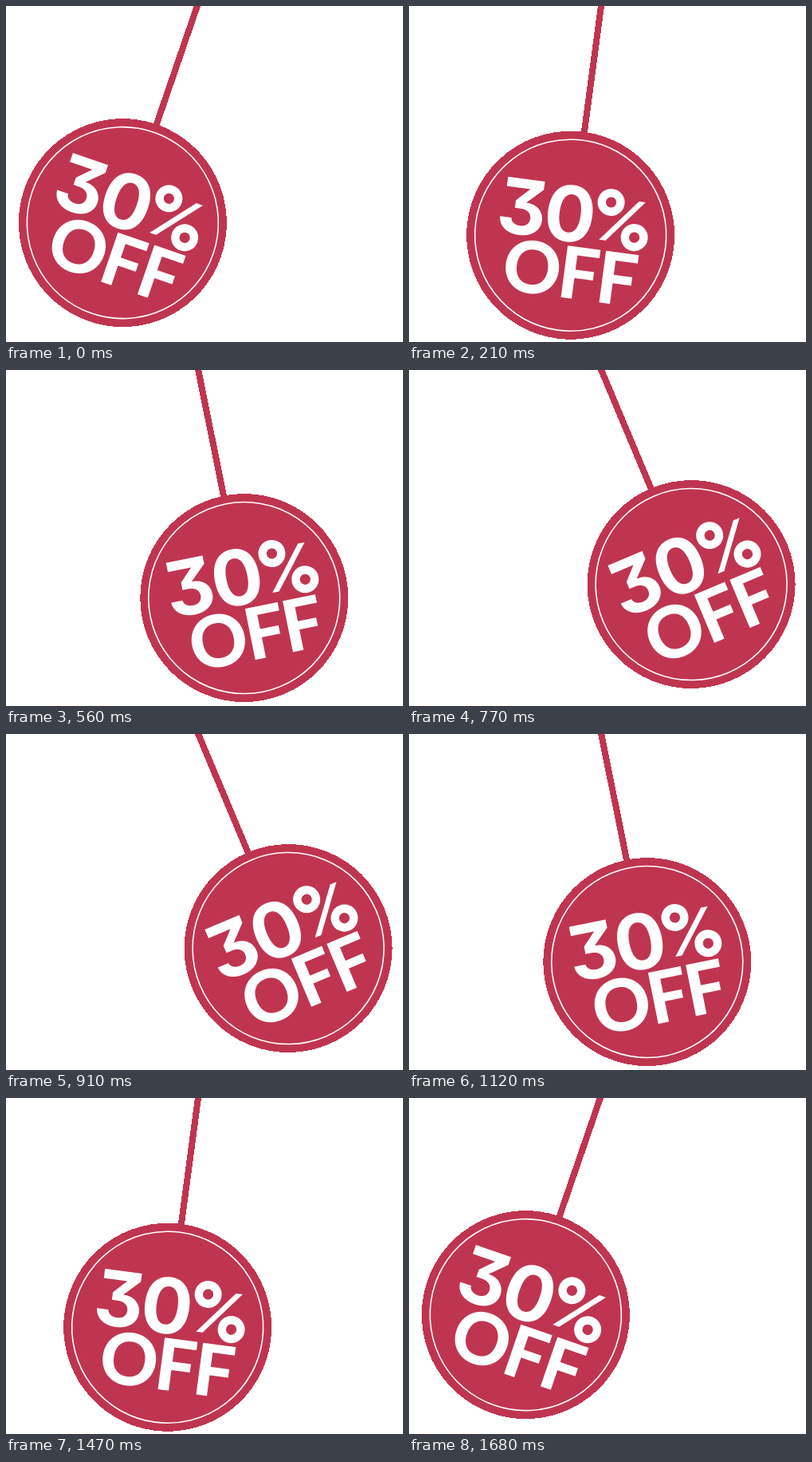
Animation, 498 px wide and 421 px high, one loop 1750 ms. Source, as an HTML page:

```html
<!DOCTYPE html>
<html lang="en">
<head>
<meta charset="utf-8">
<title>30% OFF</title>
<style>
  html, body { margin: 0; width: 100%; height: 100%; overflow: hidden; background: #fff; }
  svg { display: block; width: 498px; height: 421px; }
  .shape { fill: #bf3550; shape-rendering: crispEdges; }
  .ring { fill: none; stroke: #fff; stroke-width: 1.6; }
  .percent { fill: none; stroke: #fff; stroke-width: 10.4; }
  .slash, text { fill: #fff; text-anchor: middle; }
  .digits { font: 700 96px Inter, sans-serif; font-feature-settings: "cv09"; }
  .letters { font: 800 90px Lato, sans-serif; }
</style>
</head>
<body>
<svg viewBox="0 0 498 421">
  <g id="tag">
    <rect class="shape" x="233" y="-30" width="8" height="200"/>
    <circle class="shape" cx="237" cy="289.3" r="130.5"/>
    <circle class="ring" cx="237" cy="289.3" r="120"/>
    <g class="digits">
      <text x="172.5" y="296.8">3</text>
      <text x="233" y="297.2">0</text>
    </g>
    <g role="img" aria-label="%">
      <circle class="percent" cx="282" cy="241.7" r="11.8"/>
      <circle class="percent" cx="316.6" cy="281.6" r="11.8"/>
      <path class="slash" d="M273 290h8.5l43.5-54h-8.5z"/>
    </g>
    <g class="letters">
      <text x="194.7" y="368">O</text>
      <text x="254" y="368">F</text>
      <text x="302.3" y="368">F</text>
    </g>
  </g>
</svg>
<script>
  const STEP = 70, STEPS = 25, TURN = 12, DEGREES = 3.8, UPRIGHT = 5;
  const tag = document.getElementById('tag');

  function draw(now) {
    const step = Math.floor(now / STEP) % STEPS;
    const swing = TURN - Math.abs(TURN - step) - UPRIGHT;
    const angle = swing * DEGREES;
    // The hanging point sits slightly aside whenever the tag is tilted.
    const dx = swing ? 4.2 : 0;
    const dy = swing ? 2 + Math.min(0, angle) * 0.2 : 0;
    tag.setAttribute('transform', `translate(${dx} ${dy}) rotate(${-angle} 237 -2)`);
    requestAnimationFrame(() => draw(performance.now() - start));
  }

  const start = performance.now();
  draw(0);
</script>
</body>
</html>
```
